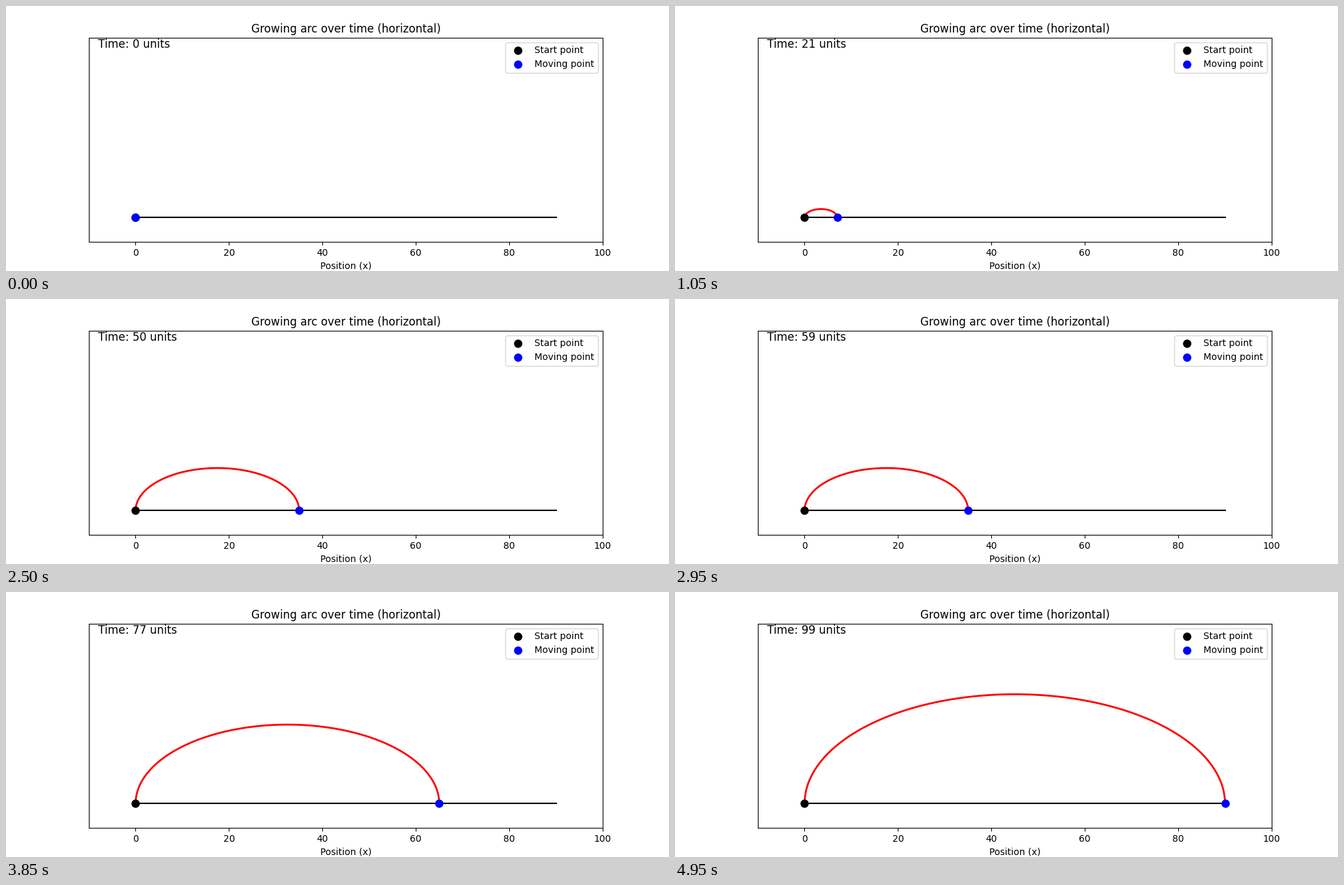
These frames come from a looping animation (1000x400 px, 5 s). A matplotlib script:

```python
import numpy as np
import matplotlib.pyplot as plt
from matplotlib.animation import FuncAnimation

plt.rcParams["font.family"] = "DejaVu Sans"

FRAMES = 100
INTERVAL = 50
HOLD = 10  # time units spent at each position
POSITIONS = [0, 3, 7, 15, 23, 35, 50, 65, 75, 90]
THETA = np.linspace(0, np.pi, 100)

fig, ax = plt.subplots(figsize=(10, 4), dpi=100)
ax.set_xlim(-10, 100)
ax.set_ylim(-10, 74)
ax.set_yticks([])
ax.set_xlabel("Position (x)")
ax.set_title("Growing arc over time (horizontal)")

ax.plot([0, POSITIONS[-1]], [0, 0], "k-", lw=1.5)
arc, = ax.plot([], [], "r-", lw=2)
ax.plot([0], [0], "ko", ms=8, label="Start point")
mover, = ax.plot([0], [0], "bo", ms=8, label="Moving point")
clock = ax.text(-8, 70, "", fontsize=12)
ax.legend(loc="upper right")


def update(t):
    x = POSITIONS[t // HOLD]
    radius = x / 2
    if x:
        arc.set_data(radius + radius * np.cos(THETA), radius * np.sin(THETA))
    else:
        arc.set_data([], [])
    mover.set_data([x], [0])
    clock.set_text(f"Time: {t} units")
    return arc, mover, clock


anim = FuncAnimation(fig, update, frames=FRAMES, interval=INTERVAL,
                     repeat=True, repeat_delay=0, blit=False)
plt.show()
```
